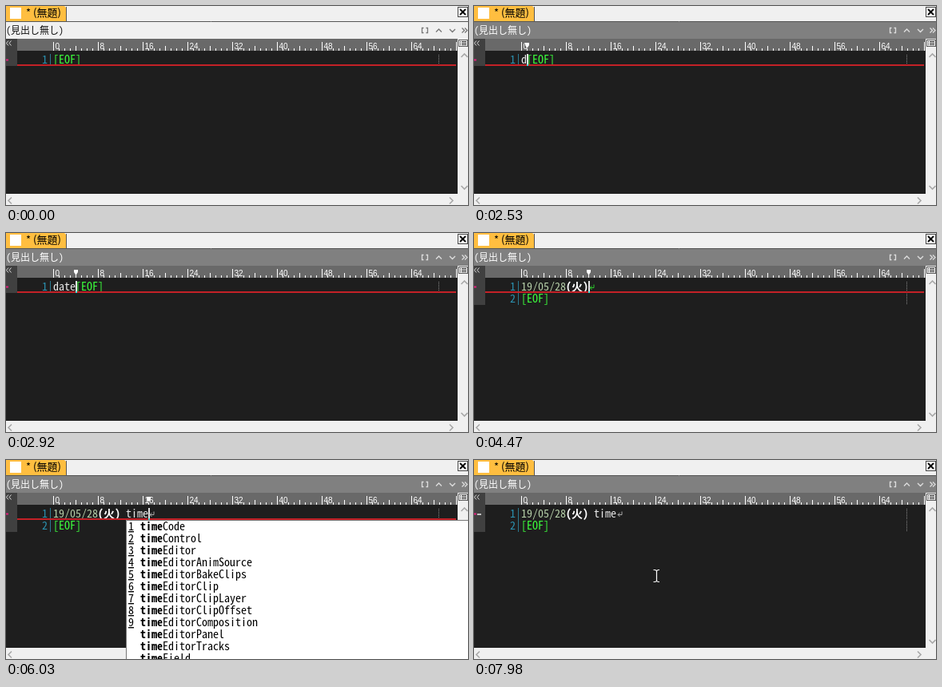
These frames come from a looping animation (578x249 px, 8000 ms). An HTML page:

```html
<!DOCTYPE html>
<html lang="ja">
<head>
<meta charset="utf-8">
<title>Editor abbreviations</title>
<style>
html, body { margin: 0; width: 100%; height: 100%; overflow: hidden; background: #f0f0f0; }
svg { display: block; width: 578px; height: 249px; isolation: isolate; }
text { white-space: pre; }
.code { font: 14px "Noto Sans Mono CJK JP", "Noto Sans CJK JP", "Noto Sans Mono", monospace; }
.head { font: 12px "Noto Sans Mono CJK JP", "Noto Sans CJK JP", monospace; }
.tab { font: 13px "Noto Sans CJK JP", "Noto Sans CJK", sans-serif; }
.ruler text { font: 10px "Liberation Sans", sans-serif; fill: #fff; }
.line { fill: none; stroke-width: 1.3; }
.eof { fill: #3cff3c; }
.num { fill: #2b91af; }
.bold { font-weight: bold; }
.index { text-decoration: underline; }
#caret { mix-blend-mode: difference; fill: #fff; }
</style>
</head>
<body>
<svg viewBox="0 0 578 249" shape-rendering="auto">
  <rect width="578" height="249" fill="#f0f0f0"/>

  <!-- tab bar -->
  <path d="M0 0H73L75 2V19H0Z" fill="#ffbe40"/>
  <path d="M75.5 1V19" stroke="#555"/>
  <path d="M0 19.5H578" stroke="#555"/>
  <rect x="5" y="2" width="14" height="14" fill="#fff"/>
  <text class="tab" x="25" y="13">* (無題)</text>
  <rect x="565.5" y="1.5" width="12" height="12" fill="#fff" stroke="#444"/>
  <path d="M568 4L575 11M575 4L568 11" stroke="#000" stroke-width="2"/>

  <!-- heading bar -->
  <rect id="bar" y="20" width="578" height="21"/>
  <text id="heading" class="head" x="0" y="35">(見出し無し)</text>
  <path id="tools" class="line" d="M522.5 27.5H520.5V33.5H522.5M525.5 27.5H527.5V33.5H525.5M538 32.5L541.5 29L545 32.5M555 29L558.5 32.5L562 29M570.5 27.5L573.5 30.5L570.5 33.5M574 27.5L577 30.5L574 33.5"/>

  <!-- editor -->
  <rect y="41" width="565" height="194" fill="#1e1e1e"/>
  <rect x="14" y="41" width="551" height="15" fill="#696969"/>
  <rect y="41" width="14" height="15" fill="#404040"/>
  <path class="line" d="M3 43.5L.5 46.5L3 49.5M6.5 43.5L4 46.5L6.5 49.5" stroke="#ddd" style="stroke-width:1"/>
  <g id="ruler" class="ruler"></g>
  <path id="marker" d="M-2 46H3V49L1 52H0L-2 49Z" fill="#fff"/>
  <rect id="gutter" y="56" width="14" fill="#404040"/>
  <path d="M0 67.5H3" stroke="#e0207c" stroke-width="2"/>
  <path id="dash" d="M4 68H9" stroke="#eee" stroke-width="1.5"/>
  <g id="rows" class="code"></g>
  <path id="underline" d="M14 74H563" stroke="#c42127" stroke-width="2"/>
  <rect id="caret" y="60" width="2" height="15"/>

  <!-- scroll bars -->
  <rect x="565" y="41" width="13" height="208" fill="#f0f0f0"/>
  <rect x="566.5" y="42.5" width="11" height="8" fill="#fff" stroke="#555"/>
  <path d="M568 44.5H576M568 46.5H576M568 48.5H576" stroke="#222" stroke-dasharray="1 1 6"/>
  <path class="line" stroke="#a8a8a8" style="stroke-width:1.6" d="M569.5 64L573.5 60L577.5 64M569.5 225L573.5 229L577.5 225M7 239.5L3 243.5L7 247.5M555 239.5L559 243.5L555 247.5"/>

  <g id="popup" class="code"></g>
  <path id="mouse" d="M-3.5 -7.5H-1.5L0.5 -6.5L2.5 -7.5H4M.5 -6.5V6.5M-3.5 7.5H-1.5L.5 6.5L2.5 7.5H4" fill="none" stroke="#fff" stroke-width="1.2"/>
</svg>
<script>
const $ = id => document.getElementById(id);
const LEFT = 59, CELL = 7, ROW = 15, DATE_CELLS = 12;
const LOOP = 8000, FOCUS = 670, EXPAND = 4170;

const words = ['dagCommandWrapper', 'dagObjectCompare', 'dagObjectHit', 'dagPose', 'dataStructure', 'date', 'dateBuilder',
  'tilt', 'timeCode', 'timeControl', 'timeEditor', 'timeEditorAnimSource', 'timeEditorBakeClips', 'timeEditorClip',
  'timeEditorClipLayer', 'timeEditorClipOffset', 'timeEditorComposition', 'timeEditorPanel', 'timeEditorTracks',
  'timeField', 'timeFieldGrp', 'timePort'];

// [time, word being typed]
const typing = [[0, ''], [2530, 'd'], [2610, 'da'], [2760, 'dat'], [2840, 'date'], [EXPAND, ''],
  [5330, ' '], [5480, ' t'], [5710, ' ti'], [5880, ' tim'], [6030, ' time']];
const selecting = [6885, 6960, 7130, 7280];

const between = (t, a, b) => t >= a && t < b;
const show = (id, on) => { $(id).style.display = on ? '' : 'none'; };
const text = (x, y, s, cls = '', fill = '') =>
  `<text x="${x}" y="${y}" class="${cls}"${fill && ` fill="${fill}"`}>${s}</text>`;

function drawRuler() {
  let out = '', ticks = '';
  for (let i = 0; i <= 72; i++) {
    const x = LEFT + CELL * i + .5;
    ticks += `M${x} ${i % 8 ? (i % 4 ? 53 : 50) : 45}V56`;
    if (i % 8 === 0 && i < 72) out += text(x + 2, 53.5, i);
  }
  $('ruler').innerHTML = `<path d="${ticks}" stroke="#fff"/>` + out;
}

function drawRows(word, expanded, edited, selected) {
  const count = expanded ? 2 : 1;
  const start = LEFT + (expanded ? DATE_CELLS * CELL : 0);
  const end = start + word.length * CELL;
  let out = '';
  for (let i = 0; i < count; i++) {
    const y = 60 + i * ROW;
    out += text(45, y + 12, i + 1, 'num');
    out += `<path d="M55.5 ${y}v${ROW}" stroke="#2b7a90"/>`;
    out += `<path d="M541.5 ${y + 1}v14" stroke="#888" stroke-dasharray="1 1"/>`;
  }
  if (selected) {
    const w = selected * CELL;
    out += `<rect x="${end - w}" y="60" width="${w}" height="${ROW}" fill="#264f78"/>`;
  }
  if (expanded) {
    out += text(LEFT, 72, '19/05/28', '', '#b5cea8') + text(LEFT + 56, 72, '(火)', 'bold', '#fff');
    out += `<path d="M${end + 7} 64.5v4h-5m2.5 -2.5l-2.5 2.5l2.5 2.5" fill="none" stroke="${edited ? '#aaa' : '#2cc82c'}"/>`;
  }
  const lead = word.length - word.trimStart().length;
  out += text(start + lead * CELL, 72, word.trim(), '', '#e8e8e8');
  out += text(expanded ? LEFT : end, expanded ? 87 : 72, '[EOF]', 'eof');
  $('rows').innerHTML = out;
  $('gutter').setAttribute('height', 4 + count * ROW);
  return end;
}

function drawPopup(prefix, x) {
  let out = `<rect x="${x}" y="75" width="${578 - x}" height="174" fill="#fff"/>` +
    `<path d="M${x + .5} 249V75.5H578" fill="none" stroke="#777"/>`;
  words.filter(w => w.startsWith(prefix)).slice(0, 12).forEach((w, i) => {
    const y = 88 + i * ROW;
    if (i < 9) out += text(x + 3, y, i + 1, 'index');
    out += text(x + 18, y, `<tspan class="bold">${prefix}</tspan>${w.slice(prefix.length)}`);
  });
  $('popup').innerHTML = out;
}

function drawMouse(t) {
  show('mouse', between(t, 70, 2530) || t >= 7980);
  const p = t >= 2530 ? 1 : Math.min(1, Math.floor((t - 70) / 75) / 7);
  const rest = (1 - p) ** 2;
  $('mouse').setAttribute('transform', `translate(${228 + 90 * rest} ${145 + 95 * rest})`);
}

function draw(t) {
  const word = typing.filter(s => s[0] <= t).pop()[1];
  const expanded = t >= EXPAND;
  const focused = t >= FOCUS;
  const moved = selecting.filter(s => s <= t).length;
  const done = t >= 7980;

  $('bar').setAttribute('fill', focused ? '#808080' : '#f0f0f0');
  $('heading').setAttribute('fill', focused ? '#fff' : '#111');
  $('tools').setAttribute('stroke', focused ? '#ddd' : '#777');
  show('heading', !between(t, 4245, 4470));

  const caret = drawRows(word, expanded, t >= 5330, done ? 0 : moved) - moved * CELL;
  $('caret').setAttribute('x', caret);
  $('marker').setAttribute('transform', `translate(${caret})`);
  show('caret', focused && !done && !between(t, 3920, EXPAND));
  show('marker', focused && !done);
  show('underline', !moved);
  show('dash', moved);

  const open = between(t, 2610, 2920) || between(t, 5710, 6810);
  show('popup', open);
  if (open) drawPopup(word.trim(), expanded ? 150 : LEFT);
  drawMouse(t);
}

const origin = performance.now();
let last = -1;
function tick() {
  const t = (performance.now() - origin) % LOOP;
  const step = Math.floor(t / 5) * 5;
  if (step !== last) draw(last = step);
  requestAnimationFrame(tick);
}
drawRuler();
draw(0);
requestAnimationFrame(tick);
</script>
</body>
</html>
```
